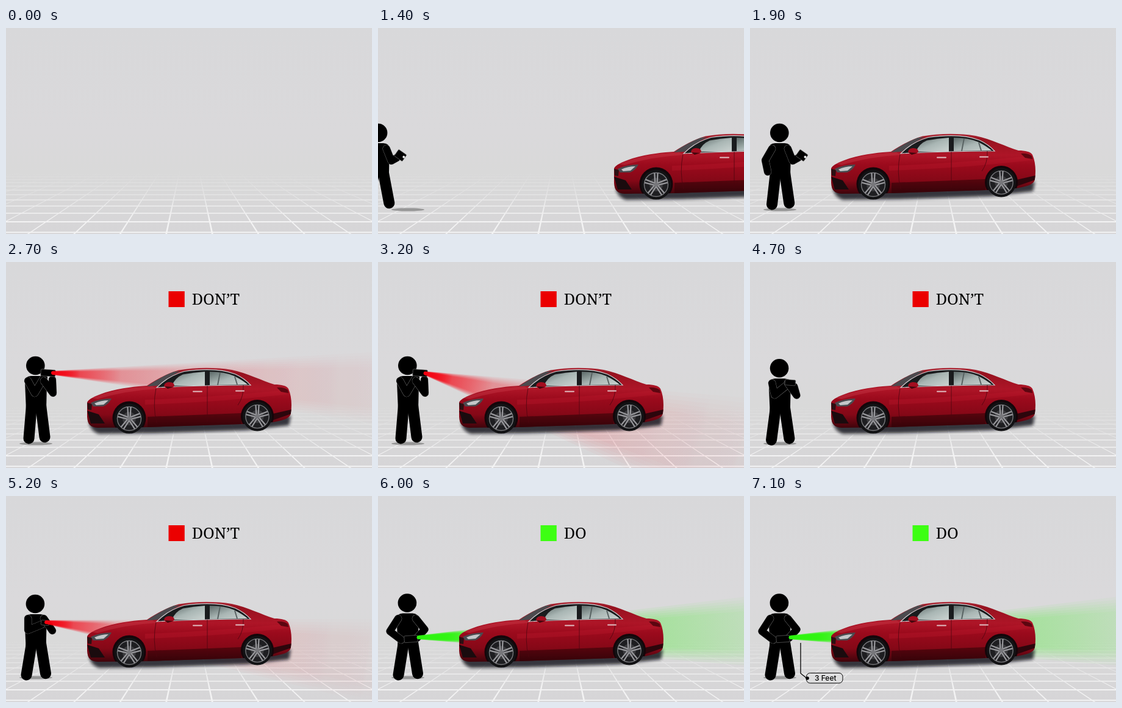
An HTML page that plays this animation: 600x338 px, repeating every 8000 ms.

```html
<!DOCTYPE html>
<html lang="en">
<head>
<meta charset="utf-8">
<title>Scan distance</title>
<style>
  html, body { margin: 0; width: 100%; height: 100%; overflow: hidden; background: #d9d9da; }
  svg { display: block; width: 100vw; height: 100vh; }
  .title { font: 25.3px "Noto Serif", Georgia, serif; }
  .note { font: 500 12px Inter, sans-serif; }
</style>
</head>
<body>
<svg viewBox="0 0 600 338" xmlns="http://www.w3.org/2000/svg">
  <defs>
    <linearGradient id="wall" x2="0" y2="1">
      <stop offset="0" stop-color="#d8d8da"/>
      <stop offset=".5" stop-color="#dad9db"/>
      <stop offset=".7" stop-color="#d9d9d9"/>
      <stop offset="1" stop-color="#d6d5d7"/>
    </linearGradient>
    <linearGradient id="fade" gradientUnits="userSpaceOnUse" x1="0" y1="234" x2="0" y2="318">
      <stop offset="0" stop-color="#000"/>
      <stop offset="1" stop-color="#fff"/>
    </linearGradient>
    <mask id="far" maskUnits="userSpaceOnUse" x="0" y="0" width="600" height="338">
      <rect width="600" height="338" fill="url(#fade)"/>
    </mask>
    <linearGradient id="paint" gradientUnits="userSpaceOnUse" x1="0" y1="173" x2="0" y2="272">
      <stop offset="0" stop-color="#b02a38"/>
      <stop offset=".1" stop-color="#96121f"/>
      <stop offset=".36" stop-color="#ae1527"/>
      <stop offset=".52" stop-color="#9b0a1c"/>
      <stop offset=".78" stop-color="#850817"/>
      <stop offset="1" stop-color="#3f040b"/>
    </linearGradient>
    <linearGradient id="glass" x2="1" y2="1">
      <stop offset="0" stop-color="#5c6968"/>
      <stop offset=".5" stop-color="#a9b6b4"/>
      <stop offset="1" stop-color="#cbd3d1"/>
    </linearGradient>
    <radialGradient id="red" gradientUnits="userSpaceOnUse" cx="0" cy="0" r="560"></radialGradient>
    <radialGradient id="green" gradientUnits="userSpaceOnUse" cx="0" cy="0" r="560"></radialGradient>
    <filter id="soft" x="-20%" y="-100%" width="140%" height="300%"><feGaussianBlur stdDeviation="2.6"/></filter>
    <clipPath id="shell">
      <path id="body" d="M133 231C134 225 148 219 163 214C190 206 215 204 231 203C250 191 266 182 283 177.5C310 172.5 345 172.5 370 177C395 182 420 195 440 201C452 201 460 203 463 208C468 219 469 234 467 248C466 256 456 260 436 263L386 266L234 271L150 272C138 271 133 266 133 252Z"/>
    </clipPath>
    <g id="wheel">
      <circle r="24.5" fill="#121214"/>
      <circle r="19.5" fill="#1e1e21" stroke="#77777b" stroke-width="1.4"/>
      <circle r="11" fill="#3a3a3d"/>
      <g id="spokes" stroke="#97979b" stroke-width="2.3"></g>
      <circle r="3.6" fill="#77777b"/>
    </g>
  </defs>

  <rect width="600" height="338" fill="url(#wall)"/>
  <g id="grid" mask="url(#far)" fill="#fff" stroke="#fff" opacity=".72"></g>
  <ellipse id="shade" cx="49" cy="298" rx="27" ry="2.6" fill="#8c8c8c"/>

  <g id="man">
    <g id="legs" stroke="#000" stroke-width="18" stroke-linecap="round"><path/><path/></g>
    <g id="trunk">
      <circle cx="48.3" cy="170" r="15.3"/>
      <path d="M31 197Q31 187 41 187H57Q67 187 67 197L66 243H33Z"/>
    </g>
    <g id="arms" fill="none" stroke-linecap="round" stroke-linejoin="round"></g>
    <g id="device"><rect rx="1.5" stroke="#777" stroke-width=".6"/><circle r="2" fill="#eee"/></g>
  </g>
  <g id="beam"></g>

  <g id="car">
    <path d="M136 262L467 252L464 268L395 276L245 281L152 282Q138 277 136 262Z" fill="#101012" opacity=".8" filter="url(#soft)"/>
    <use href="#body" fill="url(#paint)"/>
    <g clip-path="url(#shell)">
      <path d="M140 223Q185 206 240 204L248 208Q195 211 150 225Z" fill="#c93a49" opacity=".4"/>
      <path d="M228 226Q340 222 448 211L462 217Q350 230 228 234Z" fill="#c01c2e" opacity=".3"/>
      <path d="M232 254Q310 251 386 248V274H232Z" fill="#2c0207" opacity=".55"/>
      <path d="M133 244L152 250L162 265L139 265Z" fill="#1a0b0e"/>
      <path d="M133 231L141 233L140 243L134 242Z" fill="#2b1013"/>
      <path d="M433 250L468 242V249L436 260Z" fill="#2c060c"/>
      <circle cx="202" cy="256" r="27.5" fill="#14060a"/>
      <circle cx="412" cy="253" r="27" fill="#14060a"/>
    </g>
    <path d="M139 231Q154 224 173 224Q168 234 159 237L143 237Z" fill="#4b4a4f"/>
    <path d="M145 232Q156 227 168 227L160 234L148 235Z" fill="#c3c7c9"/>
    <path d="M231 204Q252 189 275 180L286 179Q268 188 249 203Z" fill="#4c4a4e"/>
    <path d="M247 206L256 198Q272 185 292 179.5Q345 172 376 184Q391 191 401 202Q320 202 247 206Z" fill="#191b1d" stroke="#cfcfd2" stroke-width="1.2"/>
    <path d="M272 203Q277 190 290 184.500Q308 181 326 180V203Z" fill="url(#glass)"/>
    <path d="M334 180Q358 180 374 187Q388 194 396 201L334 202Z" fill="url(#glass)"/>
    <path d="M351 181L347 202M375 188L379 201" stroke="#596363" stroke-width="2"/>
    <path d="M246 207Q240 237 247 264M330 203V262M389 202Q390 221 380 235" fill="none" stroke="#4d0610" stroke-width=".8"/>
    <path d="M307 212.500H321M377 211.500H390" stroke="#e1bdc1" stroke-width="2" stroke-linecap="round"/>
    <path d="M259 204Q259 198 267 197Q276 197 276 203Q274 207 265 208Z" fill="#a30d1f"/>
    <path d="M260 204L274 205L265 208Z" fill="#41070d"/>
    <path d="M444 206Q455 205 462 210L463 215L451 213Z" fill="#5c0610"/>
    <use href="#wheel" x="202" y="257"/>
    <use href="#wheel" transform="translate(412 253.500) scale(.98)"/>
  </g>

  <g id="head">
    <rect x="266.500" y="48" width="26.300" height="26"/>
    <text class="title" x="304.700" y="70.400"></text>
  </g>
  <g id="note">
    <path fill="none" stroke="#000" stroke-width="1.3" pathLength="1" stroke-dasharray="1 2" d="M83 241V291L93 299"/>
    <g>
      <rect x="92.5" y="290.5" width="59.5" height="16.5" rx="6" fill="#dededf" stroke="#000"/>
      <text class="note" x="106" y="303">3 Feet</text>
    </g>
    <circle cx="94" cy="299"/>
  </g>
</svg>

<script>
const $ = s => document.querySelector(s);
const LOOP = 8000, STEP = 100, RAD = Math.PI / 180;

function add(parent, tag, attrs) {
  const el = document.createElementNS('http://www.w3.org/2000/svg', tag);
  set(el, attrs);
  return parent.appendChild(el);
}
function set(el, attrs) {
  for (const k in attrs) el.setAttribute(k, attrs[k]);
}
const ramp = (t, a, b) => Math.min(1, Math.max(0, (t - a) / (b - a)));
const ease = p => p * p * (3 - 2 * p);
const mix = (a, b, p) => a.map((v, i) => v + (b[i] - v) * p);

// Eased values from rows of [time, values].
function track(t, rows) {
  let i = 0;
  while (i < rows.length - 2 && t >= rows[i + 1][0]) i++;
  const [a, from] = rows[i], [b, to] = rows[i + 1];
  return mix(from, to, ease(ramp(t, a, b)));
}

// Floor grid in perspective
const VX = 300.5, VY = 160;
for (let i = -14; i < 15; i++) {
  const x = VX + (i + .5) * 75.6, top = VX + (x - VX) * .41;
  add($('#grid'), 'path', { d: `M${top - .4} 233L${top + .4} 233L${x + 1.4} 338L${x - 1.4} 338Z`, stroke: 'none' });
}
for (let n = 0; n < 13; n++) {
  const y = VY + 1 / (.00571 + n * .00062);
  add($('#grid'), 'path', { d: `M0 ${y}H600`, 'stroke-width': 2 - n * .09 });
}

for (let i = 0; i < 5; i++)
  for (const s of [-1, 1])
    add($('#spokes'), 'path', { d: `M${s * 1.6} -2L${s * 2.6} -19`, transform: `rotate(${i * 72})` });

// Beam colours: offset and opacity of a single layer
const LAYERS = 6;
const TINT = {
  red: ['#f4000f', [[0, .5], [.08, .17], [.2, .065], [.4, .034], [.7, .017], [1, .005]]],
  green: ['#2cf50d', [[0, .6], [.08, .45], [.14, .18], [.5, .075], [.75, .05], [1, .022]]]
};
for (const id in TINT)
  for (const [offset, o] of TINT[id][1])
    add($('#' + id), 'stop', { offset, 'stop-color': TINT[id][0], 'stop-opacity': o });
const wedges = Array.from({ length: LAYERS }, () => add($('#beam'), 'path', {}));
const lens = add($('#beam'), 'circle', { r: 3 });

// Each arm: a pale rim below a black limb
const arms = [0, 1].map(() => [
  add($('#arms'), 'path', { stroke: '#8a8a8a', 'stroke-width': 12.6 }),
  add($('#arms'), 'path', { stroke: '#000', 'stroke-width': 11.8 })
]);

// drop, stance, left arm, right arm, device x y angle width height
const POSE = {
  walk: [2, 0, 36, 198, 25, 217, 29, 236, 62, 198, 70, 218, 79, 213, 85, 209, 35, 16, 13],
  aim: [0, 0, 36, 195, 47, 215, 62, 190, 62, 195, 77, 215, 76, 193, 69, 182, 4, 24, 11],
  low: [7, 1, 36, 201, 36, 220, 58, 211, 62, 201, 76, 221, 70, 212, 64, 208, 5, 13, 8],
  waist: [5.5, 1, 33, 201, 19.5, 222, 38, 236, 62, 201, 76.5, 219, 64, 233, 54, 234.5, -4, 22, 11]
};
const POSES = [[1900, POSE.walk], [2300, POSE.aim], [4500, POSE.aim], [4850, POSE.low],
               [5450, POSE.low], [5750, POSE.waist], [LOOP, POSE.waist]];
// lens x y, upper and lower edge in degrees
const BEAMS = [[2700, [77, 182, -3.2, 8.4]], [3600, [78, 183, 11, 36]], [4500, [78, 183, 11, 36]],
               [4850, [66, 207, -9, 4.5]], [5150, [66, 207, 0, 13.5]], [5250, [66, 207, 0, 13.5]],
               [5450, [66, 207, -2, 11]], [5700, [66.5, 232, -6.6, 4.4]], [LOOP, [66.5, 232, -6.6, 4.4]]];

function drawMan(t) {
  const p = track(t, POSES);
  const stride = 1 - ramp(t, 1750, 1950);
  const swing = stride * Math.cos((t - 1400) / 500 * 2 * Math.PI);
  const [drop, wide] = p;
  set($('#man'), { transform: `translate(${-93 * (1 - ease(ramp(t, 1000, 1820)))} 0)`,
                   visibility: t < 1000 ? 'hidden' : 'visible' });
  set($('#trunk'), { transform: `translate(${-wide * .4} ${drop})` });
  const [left, right] = $('#legs').children;
  const feet = 289.5 + wide * 4;
  set(left, { d: `M42 ${235 + drop}L${37.5 - wide * 4 - 6 * swing} ${feet}` });
  set(right, { d: `M57 ${235 + drop}L${63.5 + wide * 1.5 + 3 * swing} ${feet - 2.3}` });
  arms.forEach((pair, i) => {
    const d = 'M' + p.slice(2 + i * 6, 8 + i * 6).join(' ');
    pair.forEach(el => set(el, { d }));
  });
  const [x, y, turn, w, h] = p.slice(14);
  const [box, dot] = $('#device').children;
  set($('#device'), { transform: `translate(${x} ${y}) rotate(${turn})` });
  set(box, { x: -w / 2, y: -h / 2, width: w, height: h });
  set(dot, { cx: w / 2 - 2, cy: -1, opacity: 1 - ramp(t, 1900, 2300) });
  set($('#shade'), { opacity: ramp(t, 900, 1200) * .85 });
}

function drawBeam(t) {
  const [x, y, hi, lo] = track(t, BEAMS);
  const show = t < 4700 ? ramp(t, 2250, 2600) * (1 - ramp(t, 4450, 4650))
    : t < 5650 ? ramp(t, 4750, 4950) * (1 - ramp(t, 5450, 5600))
    : ramp(t, 5700, 5950);
  const id = t < 5650 ? 'red' : 'green';
  const mid = (hi + lo) / 2, half = (lo - hi) / 2;
  set($('#beam'), { transform: `translate(${x} ${y}) rotate(${mid})`, opacity: show });
  wedges.forEach((el, i) => {
    const k = 1.05 - i * .09, far = 640 * Math.tan(half * k * RAD);
    set(el, { d: `M0 ${-3 * k}L640 ${-far - 2}L640 ${far + 2}L0 ${3 * k}Z`, fill: `url(#${id})` });
  });
  set(lens, { fill: TINT[id][0] });
}

function drawNotes(t) {
  const good = t >= 5600;
  const [box, label] = $('#head').children;
  set($('#head'), { opacity: ramp(t, 2050, 2300) });
  set(box, { fill: good ? '#3dff12' : '#eb0000' });
  label.textContent = good ? 'DO' : 'DON’T';
  const [line, tag, dot] = $('#note').children;
  const drawn = ramp(t, 6000, 6300);
  set(line, { 'stroke-dashoffset': 1 - drawn, opacity: drawn ? 1 : 0 });
  set(tag, { opacity: ramp(t, 6100, 6300) });
  set(dot, { r: 2.8 * ramp(t, 6150, 6400) });
}

function draw(t) {
  set($('#car'), { transform: `translate(${490 * (1 - ease(ramp(t, 1000, 1820)))} 0)` });
  drawMan(t);
  drawBeam(t);
  drawNotes(t);
}

function tick() {
  draw(Math.floor(performance.now() % LOOP / STEP) * STEP);
  requestAnimationFrame(tick);
}
tick();
</script>
</body>
</html>
```
